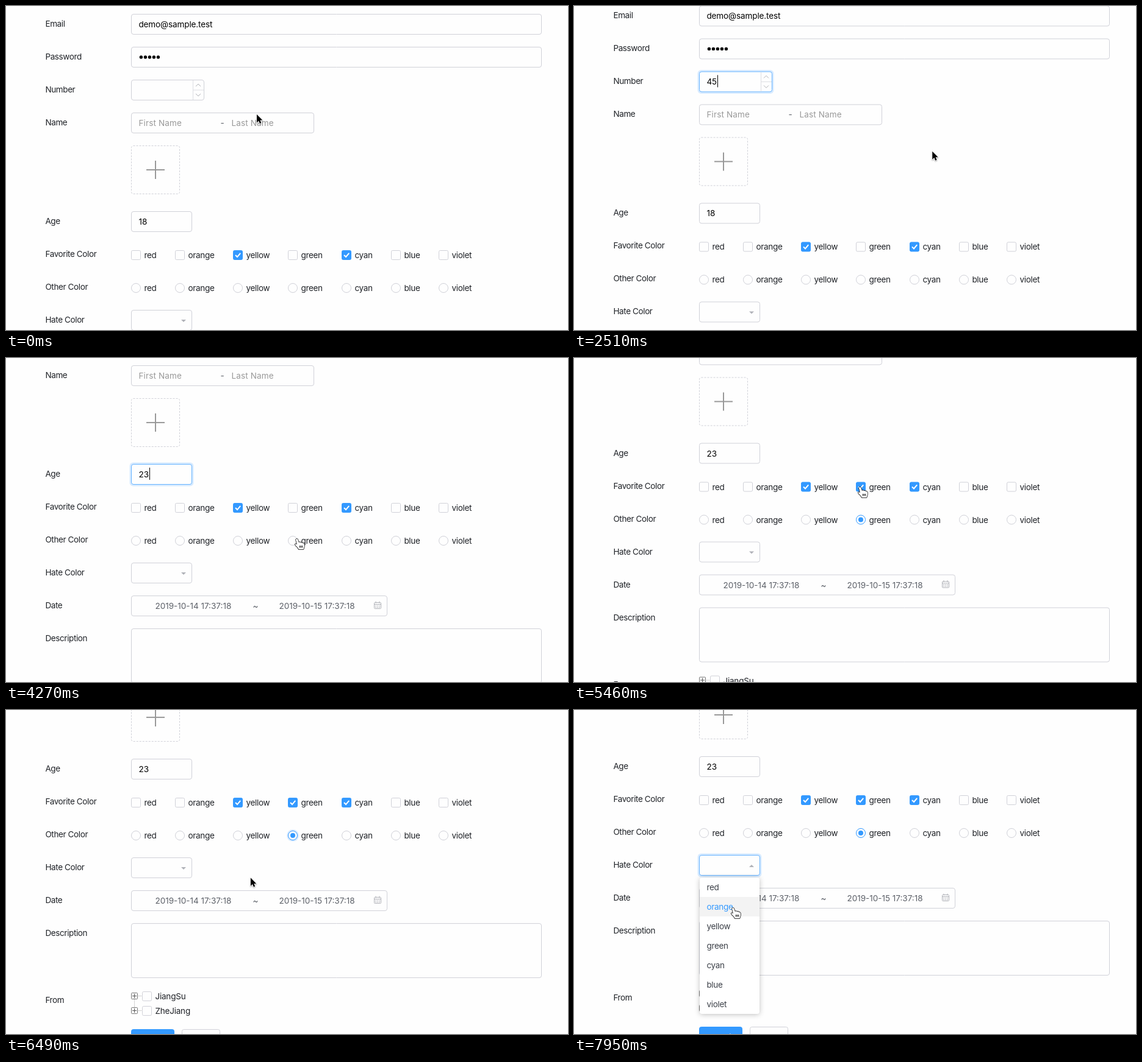
Write an HTML page with a canvas that moves like this. It is 921 px wide and 532 px high and loops after 8 s.

```html
<!DOCTYPE html>
<html lang="en">
<head>
<meta charset="utf-8">
<title>Form</title>
<style>
html, body { margin: 0; width: 921px; height: 532px; overflow: hidden; background: #fefefe }
canvas { display: block }
</style>
</head>
<body>
<canvas id="stage" width="921" height="532"></canvas>
<script>
const c = document.getElementById('stage').getContext('2d');
const LOOP = 8000, STEP = 147.3;
const PAGE = '#fefefe', BLUE = '#3399ff', FOCUS = '#66b3ff', RING = '#d8ebff', LINE = '#d0d1d8';
const DARK = '#1f2227', GRAY = '#999', SLATE = '#5c6068', ICON = '#b0b2b8';
const COLORS = ['red', 'orange', 'yellow', 'green', 'cyan', 'blue', 'violet'];
const COLUMNS = [205, 277, 372, 462, 550, 631, 709];
const LABELS = ['Email', 'Password', 'Number', 'Name', , , 'Age', 'Favorite Color', 'Other Color',
  'Hate Color', 'Date', 'Description'];
const FAVORITE = 409, OTHER = 463, MENU = 536, ROW = 32;
const FIELDS = {
  number: { y: 121, w: 120 }, name: { y: 175, w: 300 }, age: { y: 337, w: 100 }, select: { y: 499, w: 100 }
};

// steps at which the user acts
const AT = { number: 5, age: 21, drag: 22, retype: 25, radio: 34, check: 37, open: 51, menu: 52 };
// scroll gestures: first step, length, distance
const SCROLLS = [[16, 4, 23.5], [26, 7.2, 174], [41, 5, 63.5]];
// pointer stops: step, x, y
const STOPS = [[0, 411, 178], [4, 264, 138], [8, 264, 138], [11, 561, 146], [15, 628, 228], [16, 628, 228],
  [21, 236, 331], [23, 187, 328], [29, 478, 297], [34, 470, 264], [37, 470, 212], [41, 594, 306],
  [46, 296, 259], [47, 292, 279], [49, 546, 151], [51, 282, 254], [54, 262, 325]];
const ARROW = new Path2D('M0 0V13.4L3 10.4 5 15 7.3 14 5.4 9.6H9.4Z');
const HAND = new Path2D('M-3 1.8C-3-.4-.3-.6.3 1.3L2 6C3 4.6 4.8 5 5.2 6.4 6.4 5.4 7.8 6 8.2 7.2 9.6 6.6 10.8 7.6 10.9 9V12C10.9 14 9.8 15 9.6 17H1.5C1 14.6-1.6 13-3.4 10.8-5.4 8.4-3.4 7.2-1.2 9Z');
const BEAM = new Path2D('M-3-8Q0-8 0-6Q0-8 3-8M0-6V6M-3 8Q0 8 0 6Q0 8 3 8M-2 1H2');

const clamp = p => Math.min(1, Math.max(0, p));
const smooth = p => p * p * (3 - 2 * p);
const scroll = k => SCROLLS.reduce((sum, [from, n, d]) => sum + d * (1 - (1 - clamp((k - from) / n)) ** 3), 0);

function pointerAt(k) {
  const n = STOPS.findIndex(s => s[0] >= k), b = STOPS[n], a = STOPS[n - 1] || b;
  const p = smooth(clamp((k - a[0]) / (b[0] - a[0] || 1)));
  const x = a[1] + (b[1] - a[1]) * p, y = a[2] + (b[2] - a[2]) * p;
  return { x, y, pageY: y + scroll(k) };
}

function over(name, k) {
  const { x, pageY } = pointerAt(k), f = FIELDS[name];
  return x > 205 && x < 205 + f.w && pageY > f.y && pageY < f.y + 34;
}

// borders fade in, so hover shows one step late
const hover = (name, k) => k > 0 && over(name, k - 1);

function overChoice({ x, pageY }) {
  const onRow = [FAVORITE, OTHER].some(y => Math.abs(pageY - y) < 9);
  return onRow && COLUMNS.some(left => x > left && x < left + 60);
}

function text(s, x, mid, color = DARK, spacing = 0) {
  c.font = '13.5px Inter, Roboto, sans-serif';
  c.letterSpacing = spacing + 'px';
  c.fillStyle = color;
  c.fillText(s, x - .6, mid + 5);
}

function line(color, width, ...pts) {
  c.beginPath();
  for (let i = 0; i < pts.length; i += 2) c.lineTo(pts[i], pts[i + 1]);
  c.strokeStyle = color;
  c.lineWidth = width;
  c.stroke();
}

function paint(fill, stroke) {
  if (fill) { c.fillStyle = fill; c.fill(); }
  if (stroke) { c.strokeStyle = stroke; c.lineWidth = 1; c.stroke(); }
}

function box(x, y, w, h, r, stroke, fill) {
  c.beginPath();
  c.roundRect(x + .5, y + .5, w - 1, h - 1, r);
  paint(fill, stroke);
}

function disc(x, y, r, fill, stroke) {
  c.beginPath();
  c.arc(x, y, r, 0, 7);
  paint(fill, stroke);
}

function dotted(dash, drawIt) {
  c.setLineDash(dash);
  drawIt();
  c.setLineDash([]);
}

function field(y, w, h = 34, focus, hovered) {
  if (focus) box(202, y - 3, w + 6, h + 6, 6, null, RING);
  box(205, y, w, h, 3.5, focus || hovered ? FOCUS : LINE, PAGE);
}

function input(name, k, value, focus, selected) {
  const { y, w } = FIELDS[name], mid = y + 17;
  field(y, w, 34, focus, hover(name, k));
  if (selected) {
    c.fillStyle = '#b3d7ff';
    c.fillRect(218, mid - 10.5, 14, 21);
  }
  text(value, 218, mid, '#000');
  if (focus && !selected) {
    c.fillStyle = '#000';
    c.fillRect(218 + Math.round(c.measureText(value).width), mid - 11, 1, 20);
  }
}

function check(x, mid, on) {
  box(x, mid - 8, 16, 16, 2, on ? BLUE : LINE, on ? BLUE : PAGE);
  if (on) line('#fff', 2, x + 4, mid, x + 7, mid + 3, x + 12.2, mid - 3.2);
}

function radio(x, mid, on, ring) {
  if (ring) disc(x, mid, 10, RING);
  disc(x, mid, 7.5, PAGE, on ? BLUE : LINE);
  if (on) disc(x, mid, 4, BLUE);
}

function numberField(k) {
  const typed = '45'.slice(0, Math.max(0, Math.floor(k / 2) - 4));
  input('number', k, typed, k >= AT.number && k < AT.age);
  line('#dddee3', 1, 306.5, 122, 306.5, 154);
  line('#dddee3', 1, 306, 138, 324, 138);
  for (const s of [-1, 1]) line(ICON, 1, 311, 138 + 6 * s, 315, 138 + 10 * s, 319, 138 + 6 * s);
}

function ageField(k) {
  const value = k < AT.retype ? '18' : '23'.slice(0, k - AT.retype + 1);
  input('age', k, value, k >= AT.age && k < AT.radio, k >= AT.drag && k < AT.retype);
}

function upload() {
  dotted([3, 2], () => box(205, 229, 80, 80, 3, LINE));
  line(GRAY, 2, 230, 269, 260, 269);
  line(GRAY, 2, 245, 254, 245, 284);
}

function choices(k) {
  COLORS.forEach((name, i) => {
    const x = COLUMNS[i], green = name === 'green';
    check(x, FAVORITE, name === 'yellow' || name === 'cyan' || green && k >= AT.check);
    radio(x + 8, OTHER, green && k >= AT.radio, green && k >= 44 && k < 50);
    for (const y of [FAVORITE, OTHER]) text(name, x + 22, y, DARK, -.3);
  });
}

function selectField(k) {
  const tip = k >= AT.menu ? -2 : 2;
  field(FIELDS.select.y, 100, 34, k >= AT.open, hover('select', k));
  c.beginPath();
  c.moveTo(287, 517 - tip);
  c.lineTo(295, 517 - tip);
  c.lineTo(291, 517 + tip);
  paint(ICON);
}

function dateField() {
  field(553, 420);
  text('2019-10-14 17:37:18', 245, 570, SLATE);
  text('~', 405, 570, SLATE);
  text('2019-10-15 17:37:18', 448, 570, SLATE);
  box(603, 564, 12, 11, 1, ICON);
  line(ICON, 1, 603, 567.5, 615, 567.5);
  for (const x of [606, 612]) line(ICON, 1, x, 562.5, x, 565.5);
  for (const y of [570, 572.5]) dotted([2, 1], () => line(ICON, 1, 605, y, 613, y));
}

function tree() {
  dotted([1, 1], () => line('#aaa', 1, 210.5, 732, 210.5, 746));
  ['JiangSu', 'ZheJiang'].forEach((name, i) => {
    const y = 727 + 24 * i;
    box(205, y - 6, 11, 11, 1, '#777');
    line('#555', 1, 207, y - .5, 214, y - .5);
    line('#555', 1, 210.5, y - 4, 210.5, y + 3);
    dotted([1, 1], () => line('#aaa', 1, 217, y - .5, 222, y - .5));
    check(223, y, false);
    text(name, 245, y, DARK, -.2);
  });
}

function menu(k) {
  if (k < AT.menu) return;
  const active = Math.floor((pointerAt(k).pageY - MENU) / ROW);
  c.save();
  c.globalAlpha = clamp((k - AT.menu + 1) / 2);
  c.shadowColor = 'rgba(0,0,0,.25)';
  c.shadowBlur = 8;
  c.shadowOffsetY = 1;
  box(205.5, MENU - .5, 99, ROW * 7 + 1, 4, null, '#fff');
  c.shadowColor = 'transparent';
  COLORS.forEach((name, i) => {
    const y = MENU + ROW * i;
    if (i === active) {
      c.fillStyle = '#f3f3f3';
      c.fillRect(206, y, 98, ROW);
    }
    text(name, 218, y + ROW / 2, i === active ? BLUE : '#3c4048', -.3);
  });
  c.restore();
}

function outlined(path, fill, stroke, width) {
  c.strokeStyle = stroke;
  c.lineWidth = width;
  c.stroke(path);
  c.shadowColor = 'transparent';
  c.fillStyle = fill;
  c.fill(path);
}

function pointer(k) {
  const p = pointerAt(k);
  c.save();
  c.translate(p.x, p.y);
  c.lineJoin = 'round';
  if (over('number', k) || over('age', k)) {
    for (const [color, width] of [['#fff', 2], ['#000', 1]]) outlined(BEAM, 'transparent', color, width);
  } else if (overChoice(p) || over('select', k) || k >= AT.menu) {
    outlined(HAND, '#fff', '#000', 1.4);
    for (const x of [3.5, 5.6, 7.7]) line('#000', 1, x, 11, x, 14.5);
  } else {
    c.shadowColor = 'rgba(0,0,0,.35)';
    c.shadowBlur = 2;
    c.shadowOffsetY = 1;
    outlined(ARROW, '#000', '#fff', 1.6);
  }
  c.restore();
}

function draw(k) {
  c.fillStyle = PAGE;
  c.fillRect(0, 0, 921, 532);
  c.save();
  c.translate(0, -scroll(k));
  LABELS.forEach((name, i) => text(name, 65, 29 + 54 * i, DARK, -.38));
  text('From', 65, 733, DARK, -.38);

  field(13, 673);
  text('demo@sample.test', 218, 30, '#000', -.1);
  field(67, 673);
  for (let i = 0; i < 5; i++) disc(221.4 + 7 * i, 84, 2.7, '#000');
  numberField(k);
  field(175, 300, 34, false, hover('name', k));
  text('First Name', 218, 192, GRAY, .15);
  text('-', 352, 192, SLATE);
  text('Last Name', 370, 192, GRAY, .15);
  upload();
  ageField(k);
  choices(k);
  selectField(k);
  dateField();
  field(607, 673, 90);
  tree();
  box(205, 781, 71, 34, 3, BLUE, BLUE);
  text('Submit', 218, 798, '#fff');
  box(288, 781, 63, 34, 3, LINE);
  text('Reset', 301, 798, SLATE);
  menu(k);
  c.restore();
  pointer(k);
}

function tick() {
  draw(Math.floor(performance.now() % LOOP / STEP + .03));
  requestAnimationFrame(tick);
}
tick();
</script>
</body>
</html>
```
